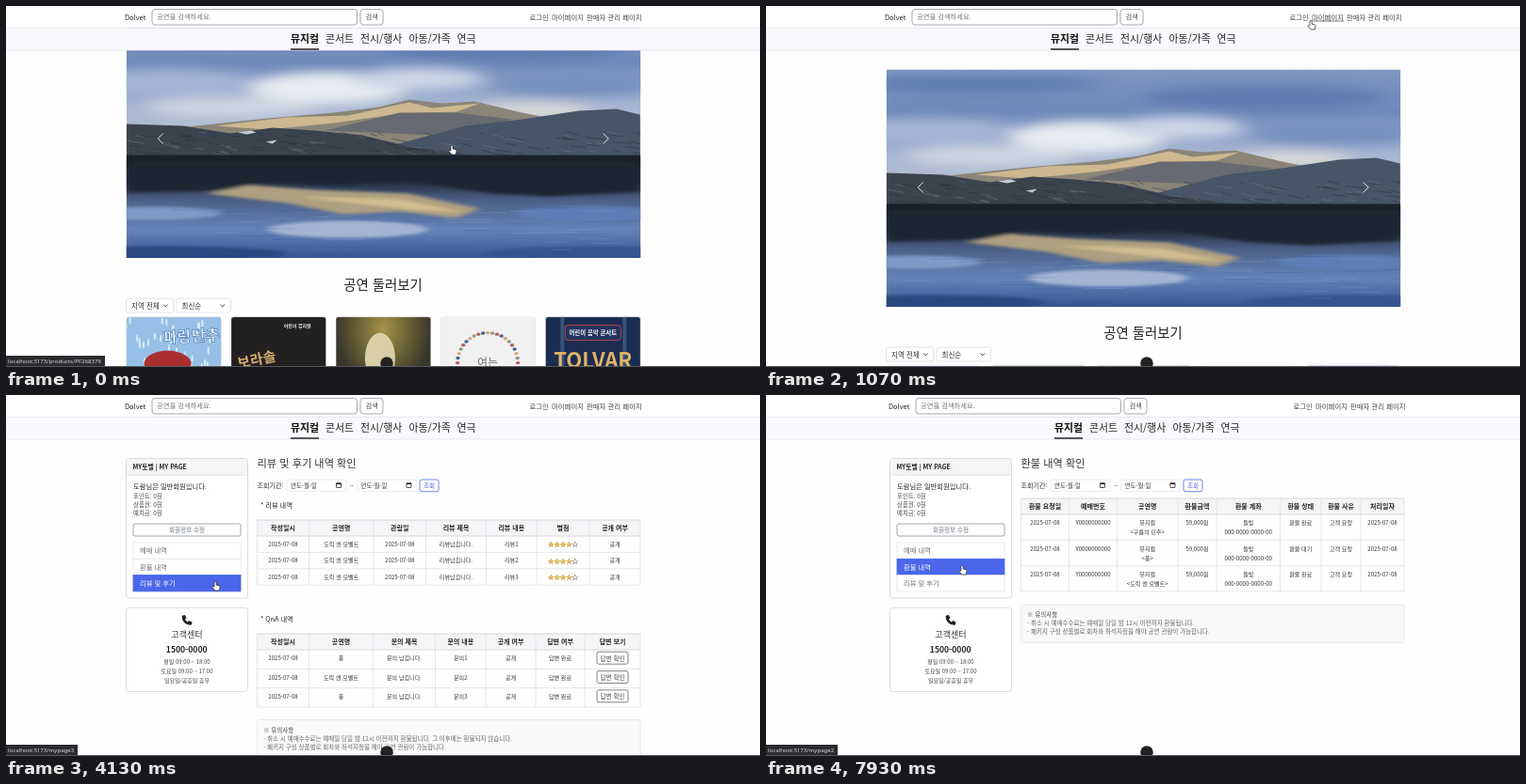
These frames come from a looping animation (800x384 px, 8 s). An HTML page:

```html
<!DOCTYPE html>
<html lang="ko">
<head>
<meta charset="utf-8">
<style>
html, body { margin: 0; width: 100%; height: 100%; overflow: hidden; background: #fefefe; }
svg { display: block; width: 800px; height: 384px; font-family: "Noto Sans CJK KR", "Noto Sans CJK", "Noto Sans", sans-serif; }
text { white-space: pre; }
</style>
</head>
<body>
<svg viewBox="0 0 800 384">
  <defs>
    <clipPath id="photoClip"><rect width="545.5" height="252.5"/></clipPath>
    <clipPath id="cardClip"><rect width="101" height="130" rx="3"/></clipPath>
    <filter id="soft" x="-50%" y="-80%" width="200%" height="260%"><feGaussianBlur stdDeviation="11 6"/></filter>
    <filter id="wet" x="-20%" y="-50%" width="140%" height="200%"><feGaussianBlur stdDeviation="5 1.6"/></filter>
    <linearGradient id="sky" x2="0" y2="1">
      <stop stop-color="#7e95c0"/><stop offset=".3" stop-color="#6f89ba"/>
      <stop offset=".6" stop-color="#a5b5d2"/><stop offset="1" stop-color="#c3c9d3"/>
    </linearGradient>
    <linearGradient id="lake" x2="0" y2="1">
      <stop stop-color="#1b222d"/><stop offset=".22" stop-color="#242e3f"/>
      <stop offset=".4" stop-color="#4b5f86"/><stop offset=".7" stop-color="#6483b8"/><stop offset="1" stop-color="#36558f"/>
    </linearGradient>
    <radialGradient id="spot" cy=".1"><stop stop-color="#a59345"/><stop offset="1" stop-color="#37362a"/></radialGradient>
  </defs>
  <g id="stage"></g>
  <g id="overlay"></g>
  <path id="cursor" stroke="#222" stroke-width=".7" fill="#fff"/>
</svg>
<script>
const LOOP = 8000;
const BLUE = '#4a66ea', LINE = '#dcdde2', HEAD = '#f5f5f7';
const byId = id => document.getElementById(id);

const text = (x, y, str, size, fill = '#333', weight = 400, anchor = 'start', extra = '') =>
  `<text x="${x}" y="${y}" font-size="${size}" fill="${fill}" font-weight="${weight}" text-anchor="${anchor}" ${extra}>${str}</text>`;
const mid = (x, y, str, size, fill, weight) => text(x, y, str, size, fill, weight, 'middle');
const box = (x1, y1, x2, y2, fill = 'none', stroke = 'none', r = 0) =>
  `<rect x="${x1}" y="${y1}" width="${x2 - x1}" height="${y2 - y1}" fill="${fill}" stroke="${stroke}" stroke-width=".8" rx="${r}"/>`;
const path = (d, fill = 'none', stroke = 'none', width = 1, extra = '') =>
  `<path d="${d}" fill="${fill}" stroke="${stroke}" stroke-width="${width}" ${extra}/>`;
const blob = (x, y, rx, ry, fill) => `<ellipse cx="${x}" cy="${y}" rx="${rx}" ry="${ry}" fill="${fill}"/>`;
const move = (x, y, body, extra = '') => `<g transform="translate(${x} ${y})" ${extra}>${body}</g>`;

function random(seed) {
  return () => (seed = (seed * 16807) % 2147483647) / 2147483647;
}

function header(hoverLink) {
  const links = [[555.5, '로그인'], [579, '마이페이지'], [616, '판매자 관리 페이지']];
  const tabs = [[339, '콘서트'], [376, '전시/행사'], [427.5, '아동/가족'], [478.5, '연극']];
  return box(-10, 0, 810, 23.5, '#fff') + box(-10, 23.5, 810, 47, '#f9f9fd') +
    path('M-10 23.5H810M-10 47H810', 'none', '#e3e3e9', .8) +
    text(126, 15, 'Dolvet', 7.4, '#222', 500) +
    box(155, 3.5, 372.5, 20, '#fff', '#8d939b', 3) + text(160, 14.3, '공연을 검색하세요.', 7.3, '#777') +
    box(376, 3.5, 400, 20, '#fff', '#8d939b', 3) + mid(388.2, 14.4, '검색', 7, '#444') +
    links.map(([x, s]) => text(x, 14.5, s, 7.4, '#444')).join('') +
    (hoverLink ? path('M579 16H613', 'none', '#444', .7) : '') +
    text(302, 39, '뮤지컬', 10.9, '#111', 700) + path('M302 46H332', 'none', '#222', 1.5) +
    tabs.map(([x, s]) => text(x, 39, s, 10.9, '#222')).join('');
}

function photo() {
  const rnd = random(41);
  let rocks = '', ripples = '';
  for (let i = 0; i < 110; i++) {
    const x = rnd() * 545, y = 118 + rnd() * 24, w = 5 + rnd() * 14;
    rocks += path(`M${x} ${y}l${w} ${1 + rnd() * 3}`, 'none', i % 3 ? '#222a34' : '#78828d', .8, 'opacity=".55"');
  }
  for (let i = 0; i < 60; i++) {
    const x = rnd() * 545, y = 198 + rnd() * 54;
    ripples += path(`M${x} ${y}h${15 + rnd() * 40}`, 'none', i % 2 ? '#36558d' : '#93abd2', .8, 'opacity=".3"');
  }
  const clouds = blob(100, 16, 130, 9, '#5f7bb0') + blob(400, 30, 130, 13, '#607cb1') +
    blob(45, 66, 90, 14, '#a4b5d6') + blob(215, 72, 85, 17, '#e8ebf0') + blob(310, 62, 70, 12, '#cbd5e6') +
    blob(475, 68, 90, 12, '#768fbf') + blob(110, 92, 90, 11, '#cdd4e0') + blob(430, 96, 65, 9, '#d9d8d7');
  return `<g clip-path="url(#photoClip)">` +
    `<rect width="546" height="150" fill="url(#sky)"/><g filter="url(#soft)">${clouds}</g>` +
    path('M55 114L150 104 220 98 268 92 300 84 335 88 370 86 420 98 470 108 545 104V150H55Z', '#8b8579') +
    path('M95 112L170 103 235 101 300 87 325 93 375 88 350 97 290 99 220 109 150 116Z', '#d9c194', 'none', 0, 'opacity=".85"') +
    path('M210 117L290 98 350 98 410 105 330 122Z', '#676a70') +
    path('M285 132L360 112 420 105 480 96 520 94 545 100V150H285Z', '#485468') +
    path('M0 110L60 112 110 120 155 114 200 117 250 122 300 134 390 146V150H0Z', '#3b434e') +
    rocks + path('M118 119l14-2 6 2-10 2ZM148 129l12-2-5 4Z', '#c5ccd6') +
    `<rect y="143" width="546" height="8" fill="#1b212a"/><rect y="149" width="546" height="104" fill="url(#lake)"/>` +
    `<g filter="url(#wet)">` +
    path('M0 150H545V182L450 187 390 184 300 171 220 175 150 172 90 181 0 183Z', '#1e2633') +
    path('M85 184L130 175 200 180 300 184 375 200 350 210 290 203 230 206 170 194Z', '#ae9f80') +
    path('M180 187L290 190 360 204 300 201Z', '#d2bd90') +
    blob(235, 222, 85, 9, '#a4b5d3') + blob(30, 205, 70, 7, '#8099c6') + blob(490, 205, 75, 8, '#5d7db5') +
    blob(40, 248, 130, 8, '#2c4a80') + blob(500, 248, 120, 8, '#345590') + `</g>${ripples}</g>` +
    path('M39 120l-5.5 5.5 5.5 5.5M506 120l5.5 5.5-5.5 5.5', 'none', '#e3e8ef', 1);
}

function posters() {
  const rnd = random(9), hues = ['#b65a5a', '#46618f', '#d8a779', '#8a9a86'];
  let snow = '', wreath = '';
  for (let i = 0; i < 40; i++) {
    snow += blob(rnd() * 101, rnd() * 55, 1, 4, '#d8ecf9');
    const a = i * Math.PI / 20;
    wreath += blob(50 + 32 * Math.cos(a), 49 + 32 * Math.sin(a), 2.2, 1.7, hues[i % 4]);
  }
  const cards = [
    box(0, 0, 101, 130, '#96c0e7') + snow +
      text(39, 27, '파랑단추', 16.5, '#fff', 900, 'start', 'stroke="#5583bd" stroke-width=".8" transform="rotate(-3 60 20)"') +
      blob(44, 50, 25, 14, '#a92e30'),
    box(0, 0, 101, 130, '#232021') + text(56, 11, '어린이 뮤지컬', 5, '#eee', 700) +
      text(7, 55, '보라솔', 15, '#d5ae6f', 700, 'start', 'transform="rotate(-12 8 50)"'),
    box(0, 0, 101, 130, 'url(#spot)') + blob(47, 44, 16, 27, '#d8cfa5'),
    box(0, 0, 101, 130, '#f2f1f1') + wreath + mid(50, 53, '여는', 12, '#736a70'),
    box(0, 0, 101, 130, '#1c2c50') + path('M18 0V90M84 0V90', 'none', '#35527f', 4) +
      box(21, 9, 80, 25, '#22325c', '#d94a45', 3) + mid(50.5, 19.5, '어린이 음악 콘서트', 6.4, '#fff', 700) +
      mid(50.5, 54, 'TOLVAR', 22, '#e0b467', 900)
  ];
  return cards.map((c, i) => move(127.5 + i * 111.2, 382.5, c + box(0, 0, 101, 130, 'none', LINE, 3), 'clip-path="url(#cardClip)"')).join('');
}

const select = (x1, x2, label) => box(x1, 363, x2, 378, '#fff', LINE, 2) +
  text(x1 + 5.5, 373.6, label, 7.5, '#333') + path(`M${x2 - 11} 369.5l2.2 2.2 2.2-2.2`, 'none', '#333', 1);

const home = `<g id="home">${move(127.7, 67.5, photo())}` +
  mid(400, 353.5, '공연 둘러보기', 14.4, '#222', 500) +
  select(127.5, 178, '지역 전체') + select(181, 238.5, '최신순') + posters() + '</g>';

function side(active, hover, icon) {
  const items = ['예매 내역', '환불 내역', '리뷰 및 후기'].map((label, i) => {
    const y = 157 + i * 17.3, on = i === active, over = i === hover;
    return box(135, y, 249, y + 17.3, on ? BLUE : over ? '#e8e9ec' : '#fff', on ? BLUE : '#e6e6ea') +
      text(142, y + 11.2, label, 7.3, on ? '#fff' : over ? '#444' : '#707070');
  }).join('');
  const points = ['포인트', '상품권', '예치금'].map((s, i) => text(135, 110 + i * 9, s + ': 0원', 6.4, '#444')).join('');
  const dy = icon ? 0 : -17;
  const phone = 'M-4.5-5l2.5-.5 1.5 3.3-1.6 1.3q1 2 3 3l1.3-1.6 3.3 1.5-.5 2.5q-.3.8-1.2.8-8.8-.5-9.2-9.2 0-.9.9-1.1Z';
  return box(127.5, 67.5, 256.5, 216, '#fff', '#d3d4d9', 3) + box(128, 68, 256, 85, HEAD, 'none', 2) +
    path('M128 85H256', 'none', LINE, .8) + text(134.5, 79, 'MY토벨 | MY PAGE', 6.8, '#222', 700) +
    text(135, 99.6, '도람님은 일반회원입니다.', 7.3, '#222', 500) + points +
    box(135, 137, 249, 150, '#fff', '#8b9098', 2) + mid(192, 146, '회원정보 수정', 6.6, '#6c757d') + items +
    box(127.5, 226.3, 256.5, 315.5 + dy, '#fff', '#d3d4d9', 3) +
    (icon ? move(192, 239.5, path(phone, '#222')) : '') +
    mid(192, 258.3 + dy, '고객센터', 9.1, '#333') + mid(191.7, 273.5 + dy, '1500-0000', 8.6, '#222', 700) +
    ['평일 09:00 ~ 18:00', '토요일 09:00 ~ 17:00', '일요일/공휴일 휴무'].map((s, i) => mid(192, 285.5 + dy + i * 10, s, 6, '#444')).join('');
}

const dateInput = x => box(x, 90, x + 63, 102.5, '#fff', '#e8e8ee', 2) + text(x + 4, 98.6, '연도-월-일', 6.4, '#333') +
  box(x + 52.5, 93.7, x + 57.5, 98.5, 'none', '#222', .5) + path(`M${x + 52.5} 94.3h5`, 'none', '#222', 1.3);

const filters = title => text(266.5, 77, title, 11.2, '#333') + text(266.5, 98.7, '조회기간:', 7.1) +
  dateInput(298) + text(365, 98.7, '~', 7) + dateInput(372.5) +
  box(439, 90, 459, 102.7, '#fff', BLUE, 2) + mid(449, 98.8, '조회', 6.6, BLUE);

// Cells are strings (lines split by "|") or functions drawing at (x, y).
function table(top, edges, rowHeight, heads, rows) {
  const bottom = top + 17 + rowHeight * rows.length, last = edges.length - 1;
  const center = i => (edges[i] + edges[i + 1]) / 2;
  const cell = (c, i, y) => typeof c === 'function' ? c(center(i), y)
    : c.split('|').map((s, k) => mid(center(i), y + k * 10, s, 6.1, '#333')).join('');
  let grid = edges.map(x => `M${x} ${top}V${bottom}`).join('');
  rows.forEach((_, i) => grid += `M${edges[0]} ${top + 17 + (i + 1) * rowHeight}H${edges[last]}`);
  return box(edges[0], top, edges[last], top + 17, HEAD) + path(grid, 'none', '#e2e3e7', .8) +
    path(`M${edges[0]} ${top}H${edges[last]}M${edges[0]} ${top + 17}H${edges[last]}`, 'none', '#cfd0d5', .8) +
    heads.map((h, i) => mid(center(i), top + 11, h, 7, '#222', 600)).join('') +
    rows.map((r, k) => r.map((c, i) => cell(c, i, top + 17 + k * rowHeight + Math.min(rowHeight / 2 + 2.3, 11.2))).join('')).join('');
}

function notice(top, tail = '') {
  return box(266.5, top, 673, top + 40.5, '#f9f9fb', '#e5e5ea', 2) + text(273, top + 13.3, '※ 유의사항', 6.5, '#444', 500) +
    text(273, top + 22.3, '- 취소 시 예매수수료는 예매일 당일 밤 12시 이전까지 환불됩니다.' + tail, 6.5, '#666') +
    text(273, top + 31.3, '- 패키지 구성 상품별로 회차와 좌석지정을 해야 공연 관람이 가능합니다.', 6.5, '#666');
}

const DAY = '2025-07-08', CODE = 'Y0000000000', DUO = '도릭 앤 모벨트', SOLO = '퐁';
const shows = ['구름의 단추', SOLO, DUO].map(s => `뮤지컬|&lt;${s}&gt;`);

const bookings = filters('예매 내역 확인') +
  table(110, [266.5, 321, 376, 446, 506, 556, 614, 673], 27.3,
    ['예매일', '예매번호', '공연명', '관람일', '매수', '취소가능일', '예매 상태'],
    shows.map(s => [DAY, CODE, s, DAY, '1', DAY, '예매 완료'])) + notice(223);

const refunds = filters('환불 내역 확인') +
  table(110, [266.5, 317.5, 368.5, 433, 474, 541.5, 585, 627, 673], 27.3,
    ['환불 요청일', '예매번호', '공연명', '환불금액', '환불 계좌', '환불 상태', '환불 사유', '처리일자'],
    shows.map((s, i) => [DAY, CODE, s, '59,000원', '들빛|000-0000-0000-00', i === 1 ? '환불 대기' : '환불 완료', '고객 요청', DAY])) + notice(223);

const stars = (x, y) => text(x - 16, y + .2, '★★★★<tspan fill="#fff" stroke="#555">★</tspan>', 6.4, '#f6c445', 400, 'start', 'stroke="#b58a3a" stroke-width=".4"');
const answer = (x, y) => box(x - 16.5, y - 9, x + 16.5, y + 4, '#fff', '#5f656c', 2) + mid(x, y + .3, '답변 확인', 6.6, '#444');

const reviews = filters('리뷰 및 후기 내역 확인') + text(270, 120, '* 리뷰 내역', 7.2, '#222', 500) +
  table(133, [266.5, 321.5, 390, 445.5, 509.5, 563, 619, 673], 17.4,
    ['작성일시', '공연명', '관람일', '리뷰 제목', '리뷰 내용', '별점', '공개 여부'],
    [1, 2, 3].map(n => [DAY, DUO, DAY, '리뷰남깁니다.', '리뷰' + n, stars, '공개'])) +
  text(270, 241, '* QnA 내역', 7.2, '#222', 500) +
  table(254, [266.5, 321.5, 389.5, 455.5, 509, 562, 614, 673], 20.3,
    ['작성일시', '공연명', '문의 제목', '문의 내용', '공개 여부', '답변 여부', '답변 보기'],
    [SOLO, DUO, SOLO].map((s, i) => [DAY, s, '문의 남깁니다.', '문의' + (i + 1), '공개', '답변 완료', answer])) +
  notice(345.5, ' 그 이후에는 환불되지 않습니다.');

const pages = [bookings, refunds, reviews];
const HOME = -1;
const visits = [[0, HOME], [1270, 0], [2670, 1], [3850, 2], [5520, 0], [6400, 2], [7300, 0], [7860, 1]];
const trail = [[0, 473, 148], [70, 473, 148], [330, 479, 149], [550, 479, 149], [950, 577, 16], [1070, 578, 15], [1400, 578, 15],
  [1950, 238, 178], [2300, 240, 178.5], [3350, 240, 178.5], [3650, 222, 198], [4700, 222, 198], [5150, 206, 164], [5750, 206, 164],
  [6200, 201, 199], [6750, 201, 199], [7100, 206, 164], [7500, 206, 164], [7750, 208, 181], [8000, 208, 181]];
const HAND = 'M-1.1 1Q0-1 1.1 1V4L4 4.7Q5.2 5 5 6.5L4.2 10H0L-3.2 6.6Q-3 5-1.1 6.2Z';
const ARROW = 'M0 0V8.2L2 6.4 3.3 9.3 4.6 8.7 3.3 6H6Z';

function pointer(t) {
  const i = trail.findIndex(p => p[0] > t);
  const [t0, x0, y0] = trail[i - 1], [t1, x1, y1] = trail[i];
  const u = (t - t0) / (t1 - t0), e = u * u * (3 - 2 * u);
  return [x0 + (x1 - x0) * e, y0 + (y1 - y0) * e];
}

function statusBar(address) {
  const width = address.length > 25 ? 105 : 76;
  return box(0, 372, width, 384, '#292b2f') + text(2, 380.3, address, 6.1, '#dcdcdc', 400, 'start', 'font-family="Noto Sans, sans-serif"');
}

function addressAt(t, page, hover) {
  if (page !== HOME) return hover < 0 ? '' : 'localhost:5173/mypage' + (hover + 1);
  if (t < 520) return 'localhost:5173/products/PF268376';
  return t > 1130 ? 'localhost:5173/mypage1' : '';
}

let shown = '';
function frame(now) {
  const t = now % LOOP;
  const [x, y] = pointer(t);
  const page = visits.filter(v => v[0] <= t).pop()[1];
  const inList = page !== HOME && x > 135 && x < 249 && y > 157 && y < 209;
  const hover = inList ? Math.floor((y - 157) / 17.3) : -1;
  const onLink = page === HOME && t > 950;
  const icon = t > 3850;
  const address = addressAt(t, page, hover);
  const key = [page, hover, onLink, icon, address].join();
  if (key !== shown) {
    shown = key;
    const body = page === HOME ? home : side(page, hover, icon) + pages[page];
    const shift = page === 0 || page === 1 ? 4 : 0;
    byId('stage').innerHTML = move(shift, 0, body + header(onLink));
    byId('overlay').innerHTML = blob(404, 380, 6.8, 6.8, '#222') + (address && statusBar(address)) + box(0, 383, 800, 384, '#55585c');
  }
  if (page === HOME) byId('home').setAttribute('transform', `translate(0 ${-52.5 * Math.exp(-t / 90)})`);
  const hand = inList || onLink || (page === HOME && t < 130);
  byId('cursor').setAttribute('d', hand ? HAND : ARROW);
  byId('cursor').setAttribute('transform', `translate(${x} ${y})`);
  requestAnimationFrame(tick);
}
const start = performance.now();
function tick() { frame(performance.now() - start); }
tick();
</script>
</body>
</html>
```
